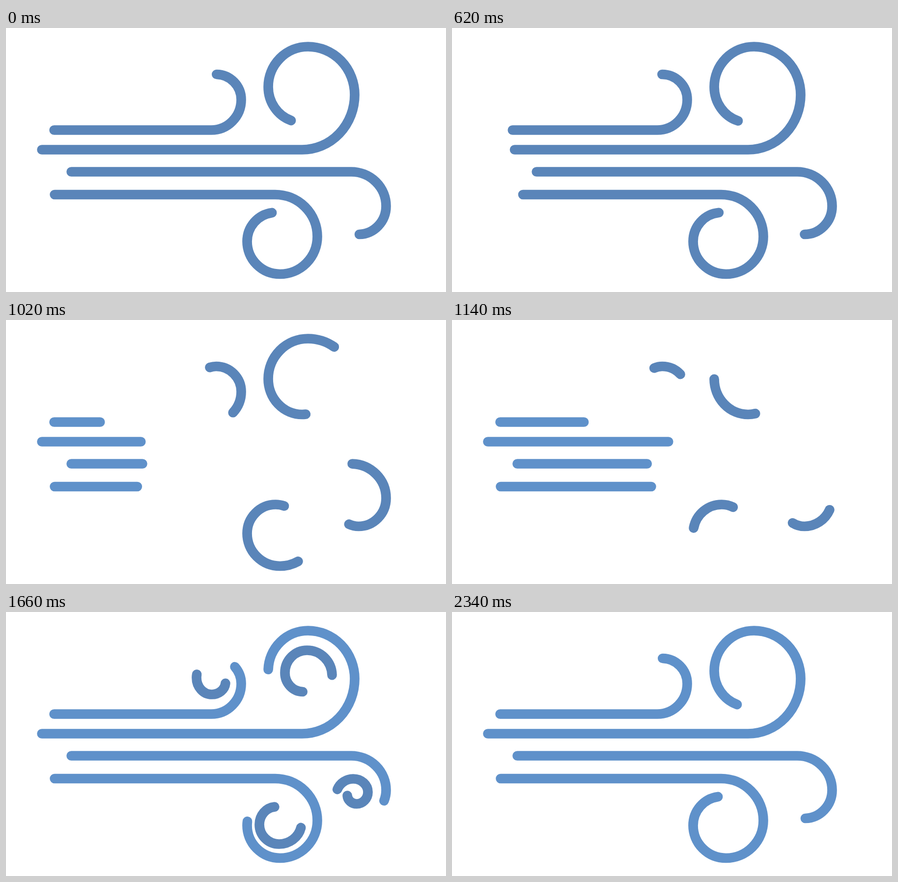
An HTML page with a canvas for the animation above (3060 ms loop, 896x538 px).

```html
<!DOCTYPE html>
<html lang="en">
<head>
<meta charset="utf-8">
<title>Wind</title>
<style>
  html, body { margin: 0; width: 100%; height: 100%; overflow: hidden; background: #fff; }
  canvas { display: block; }
</style>
</head>
<body>
<canvas id="stage" width="896" height="538"></canvas>
<script>
const LOOP = 3060, FIRST = 500, STEP = 40;
const DARK = '#5a85b9', LIGHT = '#5f91ca';
const ctx = document.getElementById('stage').getContext('2d');

// Each gust: a straight run, then quarter turns winding inwards.
// rest = path length covered while the gust stands still.
const gusts = [
  { sweep: 0, rest: 496, from: [98, 208], pts: [[418, 208], [479, 146], [428, 94.5], [388, 134],
    [419, 168], [447, 143], [425, 121], [407, 139], [421, 153]] },
  { sweep: 0, rest: 1069, from: [73, 248], pts: [[603, 248], [710, 136], [615, 38], [534, 120],
    [603, 192.5], [664, 130], [613, 78], [568, 124], [605, 162.5], [638, 133], [611, 107], [588, 129]] },
  { sweep: 1, rest: 768, from: [133, 293], pts: [[703, 293], [774, 363], [718, 420.5], [672, 375],
    [707, 340], [737, 367], [714, 391], [695, 373], [711, 357], [724, 370], [713, 381], [704, 372]] },
  { sweep: 1, rest: 892, from: [99, 339.5], pts: [[548, 339.5], [634, 425], [558, 501.5], [491, 435],
    [549, 376], [602, 429], [556, 473], [516, 433], [550, 397], [581, 427], [555, 452], [533, 430]] }
];

for (const g of gusts) {
  const [first, ...turns] = g.pts;
  let d = `M${g.from} L${first}`, prev = first;
  for (const p of turns) {
    d += ` A${Math.abs(p[0] - prev[0])} ${Math.abs(p[1] - prev[1])} 0 0 ${g.sweep} ${p}`;
    prev = p;
  }
  g.path = new Path2D(d);
}

// Smooth monotone curve through [time, value] keys.
function curve(keys) {
  const n = keys.length - 1;
  const slope = i => (keys[i + 1][1] - keys[i][1]) / (keys[i + 1][0] - keys[i][0]);
  const tangent = i => {
    if (i === 0 || i === n) return 0;
    const a = slope(i - 1), b = slope(i);
    return a * b > 0 ? 2 * a * b / (a + b) : 0;
  };
  return t => {
    if (t <= keys[0][0]) return keys[0][1];
    if (t >= keys[n][0]) return keys[n][1];
    let i = 0;
    while (t > keys[i + 1][0]) i++;
    const [t0, v0] = keys[i], [t1, v1] = keys[i + 1];
    const h = t1 - t0, u = (t - t0) / h, w = 1 - u;
    return v0 * w * w * (1 + 2 * u) + v1 * u * u * (3 - 2 * u)
      + h * u * w * (tangent(i) * w - tangent(i + 1) * u);
  };
}

// Positions along the path, as multiples of the resting length.
const tail = curve([[460, 0], [620, 0.051], [860, 0.441], [1140, 0.918], [1380, 1.0585],
  [1660, 1.1135], [1840, 1.16], [2140, 1.4]]);
const head = curve([[460, 1], [620, 1.002], [860, 1.022], [1140, 1.0355], [1380, 1.199],
  [1660, 1.309], [1940, 1.385], [2140, 1.4]]);
const next = curve([[660, 0], [740, 0.008], [860, 0.042], [1140, 0.344], [1380, 0.713],
  [1660, 0.915], [1960, 0.984], [2340, 1]]);

function stroke(g, a, b, color) {
  if (b <= a) return;
  ctx.strokeStyle = color;
  ctx.setLineDash([(b - a) * g.rest, 9999]);
  ctx.lineDashOffset = -a * g.rest;
  ctx.stroke(g.path);
}

function draw(t) {
  ctx.fillStyle = '#fff';
  ctx.fillRect(0, 0, 896, 538);
  ctx.lineWidth = 19.7;
  ctx.lineCap = 'round';
  for (const g of gusts) {
    stroke(g, 0, next(t), LIGHT);
    stroke(g, tail(t), head(t), DARK);
  }
}

const begin = performance.now();
function tick() {
  const t = (performance.now() - begin) % LOOP;
  draw(t < FIRST ? 0 : FIRST + Math.floor((t - FIRST) / STEP) * STEP);
  requestAnimationFrame(tick);
}
tick();
</script>
</body>
</html>
```
